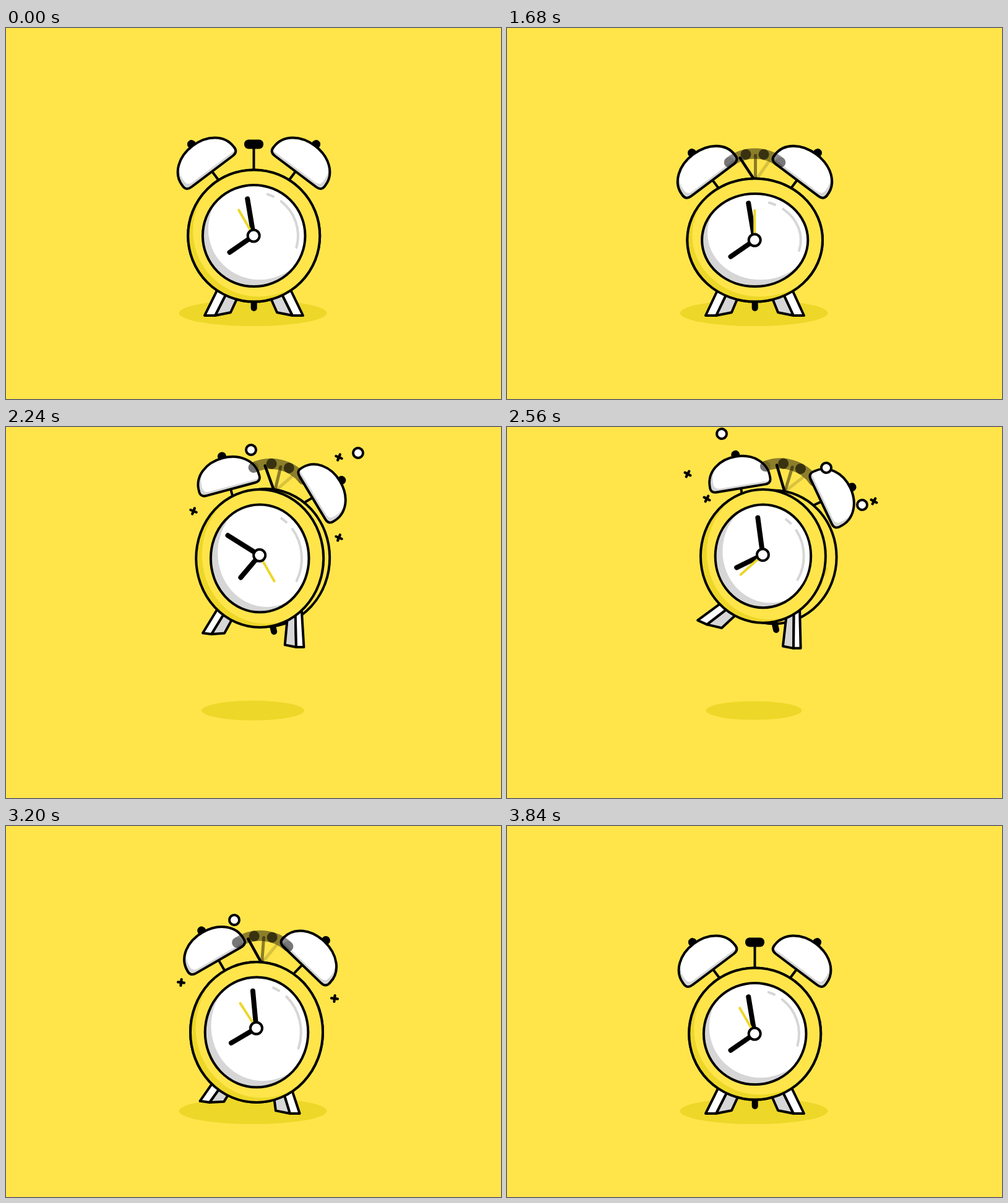
These frames come from a looping animation (800 px wide and 600 px high, 3.92 s). An HTML page:

```html
<!DOCTYPE html>
<html lang="en">
<head>
<meta charset="utf-8">
<title>Alarm clock</title>
<style>
html, body { margin: 0; width: 100%; height: 100%; overflow: hidden; background: #ffe54a; }
svg { display: block; width: 100vw; height: 100vh; }
</style>
</head>
<body>
<svg id="stage" viewBox="0 0 800 600" stroke-linecap="round" stroke-linejoin="round"></svg>
<script>
const LOOP = 3920, STEP = 80;
const YELLOW = '#ffe54a', DARK = '#edd728', GREY = '#d6d6d6', INK = '#000';
const OUTLINE = `stroke="${INK}" stroke-width="4"`;
const stage = document.getElementById('stage');

// x, y, rx, ry: front rim; bx, by: back rim offset; mx, my, tilt, turn: bells;
// l*, r*: left and right leg (foot x, y, hip angle a, width w, bend b);
// px, py: peg; sh: shadow radius; min, hr, sec: hands.
const rest = { x: 400.7, y: 336, rx: 106.5, ry: 106.5, hub: 0, bx: 0, by: 0,
  mx: 400.5, my: 232, tilt: 0, turn: 0,
  lx: 338, ly: 465, la: 115.6, lw: 1, lb: 0, qx: 463, qy: 465, qa: 64.4, qw: 1,
  px: 0, py: 117, sh: 119.5, min: -9.5, hr: 235.3, sec: 0 };
const leap = { x: 406.5, y: 235, rx: 106.5, ry: 114, hub: -7.5, bx: 2, by: 0,
  mx: 409.5, my: 121, tilt: 0.9, turn: 3,
  lx: 351, ly: 373, la: 117, lw: 0.77, lb: 0, qx: 465, qy: 368, qa: 58.5, qw: 0.75,
  px: 6.5, py: 122, sh: 107, min: 720, hr: 456.5, sec: 360 };
const lean = { x: 410.2, y: 212.5, rx: 103, ry: 111.5, hub: -5, bx: 10, by: -1,
  mx: 429.2, my: 107.5, tilt: 6, turn: 22,
  lx: 332, ly: 335, la: 125, lw: 0.83, lb: 7, qx: 469, qy: 356, qa: 56, qw: 0.73,
  px: 23, py: 118.5, sh: 83, min: 1009, hr: 567, sec: 857 };
const hang = { x: 416, y: 207.5, rx: 100, ry: 105.5, hub: -0.5, bx: 22, by: 4,
  mx: 450, my: 116.5, tilt: 11.2, turn: 30,
  lx: 319, ly: 312.5, la: 127, lw: 1.06, lb: 37, qx: 457, qy: 363, qa: 65, qw: 0.65,
  px: 17, py: 120, sh: 75, min: 1073.5, hr: 595.3, sec: 976 };
const land = { x: 405, y: 333.5, rx: 107, ry: 113.5, hub: -6.5, bx: 0, by: 0,
  mx: 411.2, my: 220.8, tilt: 3.2, turn: 7,
  lx: 329, ly: 447, la: 125, lw: 0.92, lb: 8, qx: 459, qy: 465, qa: 65, qw: 0.92,
  px: 0, py: 100, sh: 119.5, min: 1070.5, hr: 595.3, sec: 1043 };

const settled = { ...rest, min: 1070.5, hr: 595.3, sec: 1050 };
const squash = (p, k) => ({ ...p, y: p.y + k, rx: p.rx + k * 0.4, ry: p.ry - k,
  my: p.my + 2 * k, py: p.py - k });
const mix = (a, b, u) =>
  Object.fromEntries(Object.keys(a).map(k => [k, a[k] + (b[k] - a[k]) * u]));

const keys = [
  [1600, rest], [1680, squash(rest, 7)], [1920, leap], [2240, lean], [2880, hang],
  [3040, mix(hang, land, 0.28)], [3200, land], [3360, squash(settled, 5)],
  [3520, squash(settled, -2.5)], [3680, squash(settled, 1)], [3840, settled]
];

// Particles: kind, time, x, y and drift per step.
const sparks = [
  ['o', 1920, 325, 35, -4, -12], ['o', 1920, 452, 51, 1, -13],
  ['+', 1920, 376, 53, 1, -12], ['+', 1920, 500, 36, 5, -11],
  ['o', 2120, 405, 30, 1, -12], ['+', 2120, 285, 110, -7, 1], ['+', 2120, 545, 60, 8, -8],
  ['o', 2240, 396, 37, 1, -12], ['o', 2240, 569, 42, 6, -7],
  ['+', 2240, 303, 136, -11, 1], ['+', 2240, 538, 49, 7, -8], ['+', 2240, 538, 179, 8, 4],
  ['o', 2480, 350, 20, -3, -9], ['+', 2480, 585, 120, 8, 0], ['+', 2480, 300, 80, -8, -4],
  ['o', 2640, 520, 60, 4, -6], ['o', 2720, 588, 130, 7, 2], ['+', 2720, 305, 120, -9, 2],
  ['o', 2880, 528, 56, 4, -8], ['o', 2880, 596, 160, 7, 3],
  ['+', 2880, 327, 54, -6, -7], ['+', 2880, 565, 70, 6, -6], ['+', 2880, 546, 198, 5, 7],
  ['o', 3080, 520, 130, 4, -4], ['o', 3120, 368, 142, 1, 10],
  ['+', 3200, 283, 253, -12, 3], ['+', 3200, 531, 279, 5, 4]
];

const slope = (i, f) => {
  if (i < 0 || i > keys.length - 2) return 0;
  return (keys[i + 1][1][f] - keys[i][1][f]) / (keys[i + 1][0] - keys[i][0]);
};
const tangent = (i, f) => {
  const a = slope(i - 1, f), b = slope(i, f);
  return a * b > 0 ? 2 * a * b / (a + b) : 0;
};

function poseAt(t) {
  if (t < 1600) {
    const beats = [480, 1040, 1520].filter(b => t >= b).length;
    return { ...rest, sec: -30 + 10 * beats };
  }
  if (t >= 3840) return settled;
  const i = keys.findIndex((k, n) => t < keys[n + 1][0]);
  const [t0, a] = keys[i], [t1, b] = keys[i + 1];
  const d = t1 - t0, u = (t - t0) / d, v = 1 - u, p = {};
  for (const f in a) {
    p[f] = v * v * (1 + 2 * u) * a[f] + u * u * (3 - 2 * u) * b[f]
      + d * u * v * (v * tangent(i, f) - u * tangent(i + 1, f));
  }
  return p;
}

const rad = deg => deg * Math.PI / 180;
const spin = (x, y, deg) => {
  const c = Math.cos(rad(deg)), s = Math.sin(rad(deg));
  return [x * c - y * s, x * s + y * c];
};
const line = (x1, y1, x2, y2, w, color = INK, more = '') =>
  `<line x1="${x1}" y1="${y1}" x2="${x2}" y2="${y2}" stroke="${color}" stroke-width="${w}" ${more}/>`;
const ellipse = (x, y, rx, ry, attrs) =>
  `<ellipse cx="${x}" cy="${y}" rx="${rx}" ry="${ry}" ${attrs}/>`;
const poly = (pts, fill) => `<polygon points="${pts.join(' ')}" fill="${fill}" ${OUTLINE}/>`;

function arc(x, y, rx, ry, from, to) {
  const at = a => `${x + rx * Math.cos(rad(a))} ${y + ry * Math.sin(rad(a))}`;
  return `M${at(from)}A${rx} ${ry} 0 0 1 ${at(to)}`;
}

function disc(id, x, y, rx, ry, light, shade, [dx, dy]) {
  return `<clipPath id="${id}">${ellipse(x, y, rx, ry, '')}</clipPath>`
    + ellipse(x, y, rx, ry, `fill="${shade}"`)
    + `<g clip-path="url(#${id})">${ellipse(x + dx, y + dy, rx, ry, `fill="${light}"`)}</g>`
    + ellipse(x, y, rx, ry, `fill="none" ${OUTLINE}`);
}

function leg(p, side, fx, fy, hip, width, bend) {
  const tx = p.x + p.rx * Math.cos(rad(hip)), ty = p.y + p.ry * Math.sin(rad(hip));
  const foot = (x, y) => {
    const [a, b] = spin(x * width * side, y * width, bend);
    return [fx + a, fy + b];
  };
  // Tops reach past the hip so that the rim hides them.
  const top = ([x, y], dx, dy) =>
    [x + (tx + dx * side * width - x) * 1.25, y + (ty + dy * width - y) * 1.25];
  const outer = foot(-17, 0), heel = [fx, fy], inner = foot(25, -5);
  const mid = top(heel, 0, 0);
  return poly([heel, inner, top(inner, 18, 7), mid], GREY)
    + poly([outer, heel, mid, top(outer, -14, -7)], '#fff');
}

const DOME = 'M-42 0Q-53 0-52-11C-52-35-29-52 0-52S52-35 52-11Q53 0 42 0Z';
function bell(p, side) {
  const k = p.rx / rest.rx;
  const [dx, dy] = spin(67.5 * side * (1 + k) / 2, 0, p.tilt);
  return `<g transform="translate(${p.mx + dx} ${p.my + dy}) rotate(${37 * side + p.turn})">`
    + line(0, -4, 0, 19 - p.turn * 0.28, 4)
    + `<circle cy="-55" r="7"/><g transform="scale(${k} 1)"><path d="${DOME}" fill="${GREY}"/>`
    + `<g clip-path="url(#dome)"><path d="${DOME}" fill="#fff" transform="translate(${-6.5 * side} -5)"/></g>`
    + `<path d="${DOME}" fill="none" ${OUTLINE}/></g></g>`;
}

function hammer(p, ringing) {
  const x = p.mx + 0.21 * p.turn, y = p.my - 1 - 0.009 * p.turn ** 2;
  let s = `<g transform="translate(${x} ${y}) rotate(${p.turn * 0.61})">`;
  if (!ringing) {
    s += line(0, -38, 0, 2, 4) + '<rect x="-15.5" y="-50.5" width="31" height="15" rx="7"/>';
  } else {
    s += line(3, -1, 22, -28, 5, INK, 'opacity=".15"')
      + line(1, -1, 1, -39, 5, INK, 'opacity=".45"')
      + `<path d="${arc(0, 25, 67, 67, -128, -52)}" fill="none" stroke="#000" stroke-width="17" opacity=".45"/>`;
    for (const a of [-38, -12.5, 12.5, 38]) {
      const [dx, dy] = spin(0, -67, a);
      s += `<circle cx="${dx}" cy="${25 + dy}" r="8.5" opacity="${Math.abs(a) > 20 ? 0.15 : 0.6}"/>`;
    }
    s += line(-1, 0, -24, -35, 4.5);
  }
  return s + '</g>';
}

function hands(p, rot) {
  const hand = (a, len, w, color) =>
    `<g transform="rotate(${a + rot})">${line(0, 0, 0, -len, w, color)}</g>`;
  return `<g transform="translate(${p.x - 0.5} ${p.y + p.hub})">`
    + hand(p.hr, 47, 8, INK) + hand(p.min, 60.5, 8, INK) + hand(p.sec, 48, 4, DARK)
    + `<circle r="9.5" fill="#fff" ${OUTLINE}/></g>`;
}

function spark([kind, at, x, y, vx, vy], t, turn) {
  const dt = t - at;
  if (dt < -160 || dt > 80) return '';
  const n = dt / STEP;
  const shape = kind === 'o' ? `<circle r="8" fill="#fff" ${OUTLINE}/>`
    : line(-5, 0, 5, 0, 4.2) + line(0, -5, 0, 5, 4.2);
  return `<g transform="translate(${x + vx * n} ${y + vy * n}) rotate(${turn})">${shape}</g>`;
}

function draw(t) {
  const p = poseAt(t), rot = p.turn * 0.6;
  const ringing = t >= 1680 && t < 3440;
  const { x, y, rx, ry } = p;
  const fx = rx - 23.7, fy = ry - 24.4;
  const bx = x + p.bx, by = y + p.by;
  const gloss = (a, b) => arc(x, y, fx - 11.5, fy - 11.5, a + rot, b + rot);
  const shadowY = 458.5 + Math.max(0, (p.sh - 107) / 5);

  let s = `<rect width="800" height="600" fill="${YELLOW}"/>`
    + `<clipPath id="dome"><path d="${DOME}"/></clipPath>`
    + ellipse(399, shadowY, p.sh, 0.14 * p.sh + 4.3, `fill="${DARK}"`)
    + line(x + p.px * 0.85, y + p.py - 14, x + p.px, y + p.py, 10)
    + ellipse(bx, by, rx, ry, `fill="${YELLOW}" ${OUTLINE}`);
  if (p.bx > 12) {
    s += `<path d="${arc(bx, by, 87, 89, 12, 18)}${arc(bx, by, 87, 89, 28, 50)}" fill="none" stroke="${DARK}" stroke-width="4"/>`;
  }
  // Once the clock has turned, the right bell passes in front of the hammer.
  const top = [bell(p, -1), bell(p, 1), hammer(p, ringing)];
  if (p.turn > 10) top.push(top.splice(1, 1)[0]);

  s += leg(p, 1, p.lx, p.ly, p.la, p.lw, p.lb)
    + leg(p, -1, p.qx, p.qy, p.qa, p.qw, 0)
    + top.join('')
    + disc('rim', x, y, rx, ry, YELLOW, DARK, spin(8, -8, rot))
    + disc('face', x, y, fx, fy, '#fff', GREY, spin(9, -11, rot))
    + `<path d="${gloss(-72, -64)}${gloss(-52, 15.5)}" fill="none" stroke="${GREY}" stroke-width="4"/>`
    + hands(p, rot);
  for (const k of sparks) s += spark(k, t, p.turn);
  stage.innerHTML = s;
}

let shown = -1;
function frame() {
  const t = Math.floor(performance.now() % LOOP / STEP) * STEP;
  if (t !== shown) draw(shown = t);
  requestAnimationFrame(frame);
}
frame();
</script>
</body>
</html>
```
